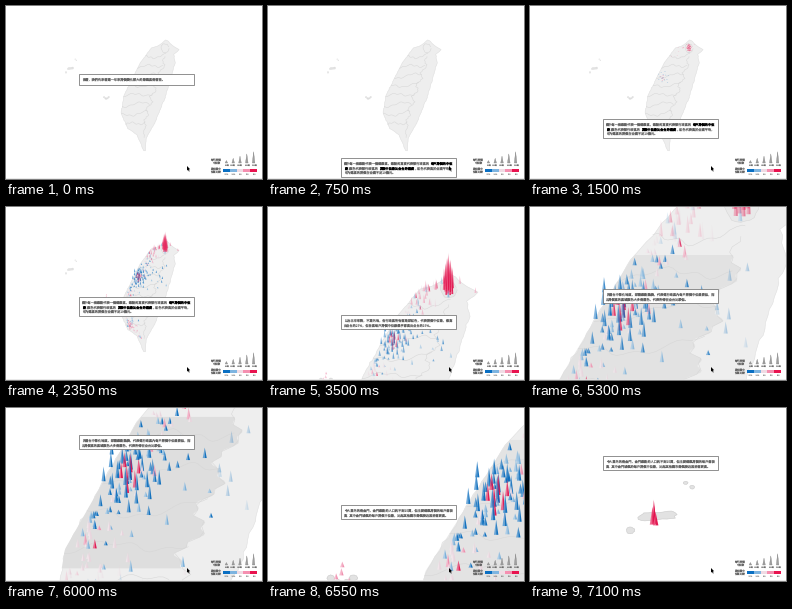
Recreate the animation shown at these times as a matplotlib script. Size 256 by 173 pixels, loop 7650 ms.

```python
import numpy as np
import matplotlib
import matplotlib.pyplot as plt
from matplotlib.animation import FuncAnimation
from matplotlib.collections import LineCollection, PolyCollection
from matplotlib.colors import to_rgb
from matplotlib.patches import Polygon, Rectangle

W, H, DPI = 256, 173, 100
LOOP, STEP = 7650, 50
CJK = "Noto Sans CJK JP"
EM = 3.2
PALETTE = ["#0a6fc2", "#7db4e0", "#f0dbe4", "#f58fb0", "#e8134f"]
RED = PALETTE[-1]

matplotlib.rcParams["text.hinting"] = "none"
rng = np.random.default_rng(8)


def px(n):
    return n * 72 / DPI


def geo(lon, lat):
    """Longitude and latitude to map units, which are pixels at zoom 1."""
    return np.column_stack([173 - (122 - np.asarray(lon)) * 29.7,
                            34 + (25.3 - np.asarray(lat)) * 32.6])


# The island as a west and an east coast over latitude
def west(lat):
    return np.interp(lat, [21.9, 22.4, 22.6, 23.05, 23.6, 24.1, 24.6, 25.05, 25.12, 25.3],
                     [120.82, 120.58, 120.27, 120.05, 120.14, 120.42, 120.7, 121.06,
                      121.32, 121.54])


def east(lat):
    return np.interp(lat, [21.9, 22.3, 22.75, 23.5, 24.6, 24.85, 25, 25.15, 25.3],
                     [120.87, 120.9, 121.18, 121.52, 121.87, 121.82, 122, 121.76, 121.58])


def across(lat, f):
    return west(lat) + f * (east(lat) - west(lat))


def spine(lat):
    return across(lat, .68 + .05 * np.sin(lat * 17) + .02 * np.sin(lat * 61))


def strip(low, high, left, right):
    lat = np.linspace(low, high, 70)
    return np.vstack([geo(left(lat), lat), geo(right(lat), lat)[::-1]])


def blob(x, y, rx, ry, waist=0):
    a = np.linspace(0, 2 * np.pi, 24, endpoint=False)
    r = 1 + rng.uniform(-.12, .12, a.size)
    squeeze = 1 - waist * np.sin(a) ** 2
    return np.column_stack([x + rx * r * np.cos(a),
                            y - ry * (.4 * waist * np.cos(a) - r * np.sin(a) * squeeze)])


LAND = strip(21.9, 25.3, west, east)
LAND += rng.normal(0, .18, LAND.shape)
TAIPEI = geo(121.53, 25.05)[0]
TAICHUNG = geo(120.65, 24.15)[0]
KAOHSIUNG = geo(120.36, 22.68)[0]
PENGHU = geo(119.55, 23.57)[0]
KINMEN = geo(118.35, 24.43)[0]

ISLES = [blob(*KINMEN, 3.1, 2, .5), blob(*(KINMEN + (-4.6, 4)), .7, .9),
         blob(*(KINMEN + (4.6, -9.2)), .4, .4), blob(*(KINMEN + (5.7, -8)), .4, .5)]
ISLES += [blob(*(PENGHU + rng.normal(0, 2.2, 2)), .8, .8) for _ in range(5)]
SHADES = [blob(*TAIPEI, 4, 4.5), strip(23.45, 24.65, west, spine)]


def county_lines():
    lat = np.linspace(22.3, 24.8, 60)
    lines = [geo(spine(lat), lat)]
    f = np.linspace(0, .68, 24)
    for i, base in enumerate(np.linspace(22.7, 24.75, 8)):
        lat = base + .12 * f + .05 * np.sin(9 * f + i * 2) + .02 * np.sin(31 * f + i)
        lines.append(geo(across(lat, f), lat))
    lines.append(SHADES[0])
    return lines


BORDERS = county_lines()


def cluster(centre, count, spread, tall, low, color):
    """Spikes on a sunflower spiral, tallest in the middle."""
    for i in range(count):
        a, r = i * 2.4, np.sqrt(i / count)
        x, y = centre + spread * r * np.array([np.cos(a), np.sin(a)])
        yield x, y, tall + (low - tall) * r * rng.uniform(.6, 1), color


def towns(count):
    """Spikes thinning out from the west coast, blue in the middle of the island."""
    for _ in range(count):
        lat = rng.uniform(22.3, 25.22)
        f = min(.04 + rng.exponential(.24), rng.uniform(.1, .97))
        x, y = geo(across(lat, f), lat)[0]
        heat = np.interp(lat, [22.3, 23, 23.65, 24.1, 24.5, 24.9], [.6, .45, .5, .15, .2, .62])
        heat = np.clip(heat + rng.normal(0, .2), 0, .85)
        yield x, y, rng.uniform(1, 2.8) + 1.4 * (lat > 24.75), PALETTE[int(heat * 5)]


SPIKES = sorted([
    *towns(240),
    *cluster(TAIPEI, 18, np.array([2.3, 4]), 17.5, 8, RED),
    *cluster(TAICHUNG, 8, np.array([3, 4]), 5, 3, RED),
    *cluster(TAICHUNG, 22, np.array([7, 9]), 4.5, 3, PALETTE[0]),
    *cluster(KAOHSIUNG, 9, np.array([2.5, 4]), 4, 2, PALETTE[3]),
    *cluster(PENGHU, 4, np.array([3, 3]), 1.5, 1, PALETTE[3]),
    *cluster(KINMEN + (-.7, 2.2), 4, np.array([.6, .6]), 4, 1.5, RED),
], key=lambda s: s[1])
SPOT = np.array([s[:2] for s in SPIKES])
TALL = np.array([s[2] for s in SPIKES])
RGB = np.array([to_rgb(s[3]) for s in SPIKES])

# How strongly each view shows each spike
far = SPOT[:, 0] < 80
capital = np.hypot(*(SPOT - TAIPEI).T) < 4.3
centre = (SPOT[:, 1] > 53) & (SPOT[:, 1] < 96) & (SPOT[:, 0] < 152)
FOCUS = np.array([~far, .3 + .7 * capital, .3 + .7 * centre, np.ones(len(far))])


def look_at(place, x, y, zoom, squash):
    """Camera with a place at a screen point: centre, zoom, vertical squash."""
    cx = place[0] - (x - W / 2) / zoom
    cy = place[1] - (y - 86) / (zoom * squash)
    return np.array([cx, cy, zoom, squash])


VIEWS = [np.array([W / 2, 86, 1, 1]), look_at(TAIPEI, 128, 100, 5.1, .73),
         look_at(TAICHUNG, 124, 72, 4.3, .9), look_at(KINMEN, 128, 108, 6, .6)]
# start, end, bend of the centre path
FLIGHTS = [(3350, 4000, (127, 21)), (5000, 5700, (146, 57)), (6450, 7100, (99, 66))]


def ease_out(t, start, end, power=2):
    return 1 - (1 - np.clip((t - start) / (end - start), 0, 1)) ** power


def camera(t):
    """Current view and the weight of each stop."""
    view, weight = VIEWS[0], np.eye(4)[0]
    for i, (start, end, bend) in enumerate(FLIGHTS):
        if t <= start:
            break
        a, b, u = VIEWS[i], VIEWS[i + 1], ease_out(t, start, end, 2.3)
        view = a + (b - a) * u
        view[:2] = (1 - u) ** 2 * a[:2] + 2 * u * (1 - u) * np.array(bend) + u * u * b[:2]
        view[2] = a[2] ** (1 - u) * b[2] ** u
        weight = np.eye(4)[i] * (1 - u) + np.eye(4)[i + 1] * u
    return view, weight


def project(points, view):
    cx, cy, zoom, squash = view
    return (points - np.array([cx, cy])) * (zoom, zoom * squash) + (W / 2, 86)


# Scroll bursts: start, end, distance
BURSTS = [(250, 750, 130), (950, 2350, 62), (2600, 4000, 234),
          (4250, 5700, 231), (5900, 7100, 233)]


def scroll(t):
    return sum(d * ease_out(t, start, end) for start, end, d in BURSTS)


# Text between asterisks is bold
STORY = [
    ["接著，我們先來看這一年來房價變化較大的鄉鎮區是哪些。"],
    ["圖中每一根錐點代表一個鄉鎮區，錐點的高度代表該行政區的*每戶房價的中位",
     "*數*，顏色代表該行政區的*房價中位數比全台的幅度*，紅色代表高於全國平均，",
     "年內這區的房價在全國不足10億元。"],
    ["以台北市來說，不意外地，各行政區所有都是深紅色，代表房價中位數，都高",
     "出全台的25%，但各區每戶房價中位數幾乎都高出全台的15%。"],
    ["再看台中彰化地區，深藍錐點圍繞，代表這行政區內每戶房價中位數較低，而",
     "且房價高的區域顏色大多是藍色，代表所得在全台比較低。"],
    ["令人意外的是金門，金門錐點的人口約不到15萬，但主要鄉鎮房價的每戶都很",
     "高，其中金門城鎮的每戶房價中位數，比起其他縣市鄉鎮接近甚至都更高。"],
]
GAP = 203

fig = plt.figure(figsize=(W / DPI, H / DPI), dpi=DPI, facecolor="white")
ax = fig.add_axes([0, 0, 1, 1])
ax.set(xlim=(0, W), ylim=(H, 0))
ax.axis("off")


def label(x, y, text, size=EM, **kw):
    kw = {"color": "#666666", "weight": "light", "zorder": 5, **kw}
    return ax.text(x, y, text, fontsize=px(size), family=CJK, va="baseline", **kw)


class Card:
    def __init__(self, top, lines):
        self.top = top
        self.height = max(11, round(5 + 4.7 * len(lines)))
        self.frame = Rectangle((73, 0), 115, self.height, fc="white",
                               ec="#777777", lw=px(.8), zorder=8)
        ax.add_patch(self.frame)
        self.words = []
        for row, line in enumerate(lines):
            x = 76
            for i, part in enumerate(line.split("*")):
                style = {"color": "black", "weight": "bold"} if i % 2 else {}
                word = label(x, 0, part, **{"zorder": 9, **style})
                self.words.append((word, x, 6.4 + 4.8 * row))
                x += EM * len(part)

    def move(self, offset):
        y = round(self.top - offset)
        shown = -self.height - 2 < y < H
        self.frame.set_visible(shown)
        self.frame.set_y(y)
        for word, x, dy in self.words:
            word.set_visible(shown)
            word.set_position((x, y + dy))


cards, top = [], 68
for lines in STORY:
    cards.append(Card(top, lines))
    top += cards[-1].height + GAP

land = Polygon(LAND, fc="#eeeeee", ec="#dddddd", lw=px(.5), zorder=1)
ax.add_patch(land)
shades = PolyCollection([], linewidths=0, zorder=1.5)
isles = PolyCollection([], facecolors="#e2e2e2", edgecolors="#cccccc", zorder=1)
borders = LineCollection([], colors="#d6d6d6", linewidths=px(.5), zorder=2)
cones = PolyCollection([], linewidths=0, zorder=3)
for c in (shades, isles, borders, cones):
    ax.add_collection(c, autolim=False)


def draw_legend():
    for y, text in [(154.5, "每戶房價"), (158, "中位數"),
                    (163.5, "與全國中"), (167, "位數比較")]:
        label(215, y, text, 2.7, ha="right")
    for i, color in enumerate(PALETTE):
        left, x = 217 + 6.8 * i, 220.4 + 6.8 * i
        ax.add_patch(Polygon([(x - 1.3, 157), (x, 154.5 - 2.2 * i), (x + 1.3, 157)],
                             fc="#a0a0a0", ec="#777777", lw=px(.3), zorder=5))
        label(x, 160, f"{(i + 1) * 500}萬", 1.8, ha="center")
        ax.add_patch(Rectangle((left, 162.5), 6.8, 3, fc=color, lw=0, zorder=5))
        label(x, 168.5, f"{25 * i - 50}%", 1.8, ha="center")


draw_legend()
ax.plot([0, W], [171.5, 171.5], color="#e4e4e4", lw=px(.8), zorder=5)
ax.add_patch(Polygon([(181, 160), (181, 164.6), (182, 163.8), (183, 165.6),
                      (183.6, 165.2), (182.8, 163.4), (184.2, 163.3)],
                     fc="black", lw=0, zorder=12))


def draw_spikes(t, view, weight):
    u = np.clip((t - 1350) / 1000, 0, 1)
    grow = max(u * u * (3 - 2 * u), .1) if u > 0 else 0
    zoom = view[2]
    base = project(SPOT, view)
    height = TALL * zoom * grow
    alpha = weight @ FOCUS
    half = .3 + .4 * zoom
    keep = (height > .35) & (alpha > .02) & (np.abs(base[:, 0] - W / 2) < W / 2 + 5)
    keep &= (base[:, 1] > -5) & (base[:, 1] - height < H)
    tris, colors = [], []
    for (x, y), h, c, a in zip(base[keep], height[keep], RGB[keep], alpha[keep]):
        tip = (x, y - h)
        tris += [[(x - half, y), tip, (x, y)], [(x, y), tip, (x + half, y)]]
        colors += [(*(c * .7 + .3), .85 * a), (*(c * .97), .95 * a)]
    cones.set_verts(tris)
    cones.set_facecolors(colors)


def update(n):
    t = n * STEP
    view, weight = camera(t)
    land.set_xy(project(LAND, view))
    shades.set_verts([project(p, view) for p in SHADES])
    shades.set_facecolors([(.87, .87, .87, a) for a in weight[1:3]])
    borders.set_segments([project(line, view) for line in BORDERS])
    isles.set_verts([project(p, view) for p in ISLES])
    isles.set_linewidths(px(.15 * min(view[2], 4)))
    draw_spikes(t, view, weight)
    offset = scroll(t)
    for card in cards:
        card.move(offset)
    return []


anim = FuncAnimation(fig, update, frames=LOOP // STEP, interval=STEP,
                     repeat=True, repeat_delay=0, blit=False)
plt.show()
```
